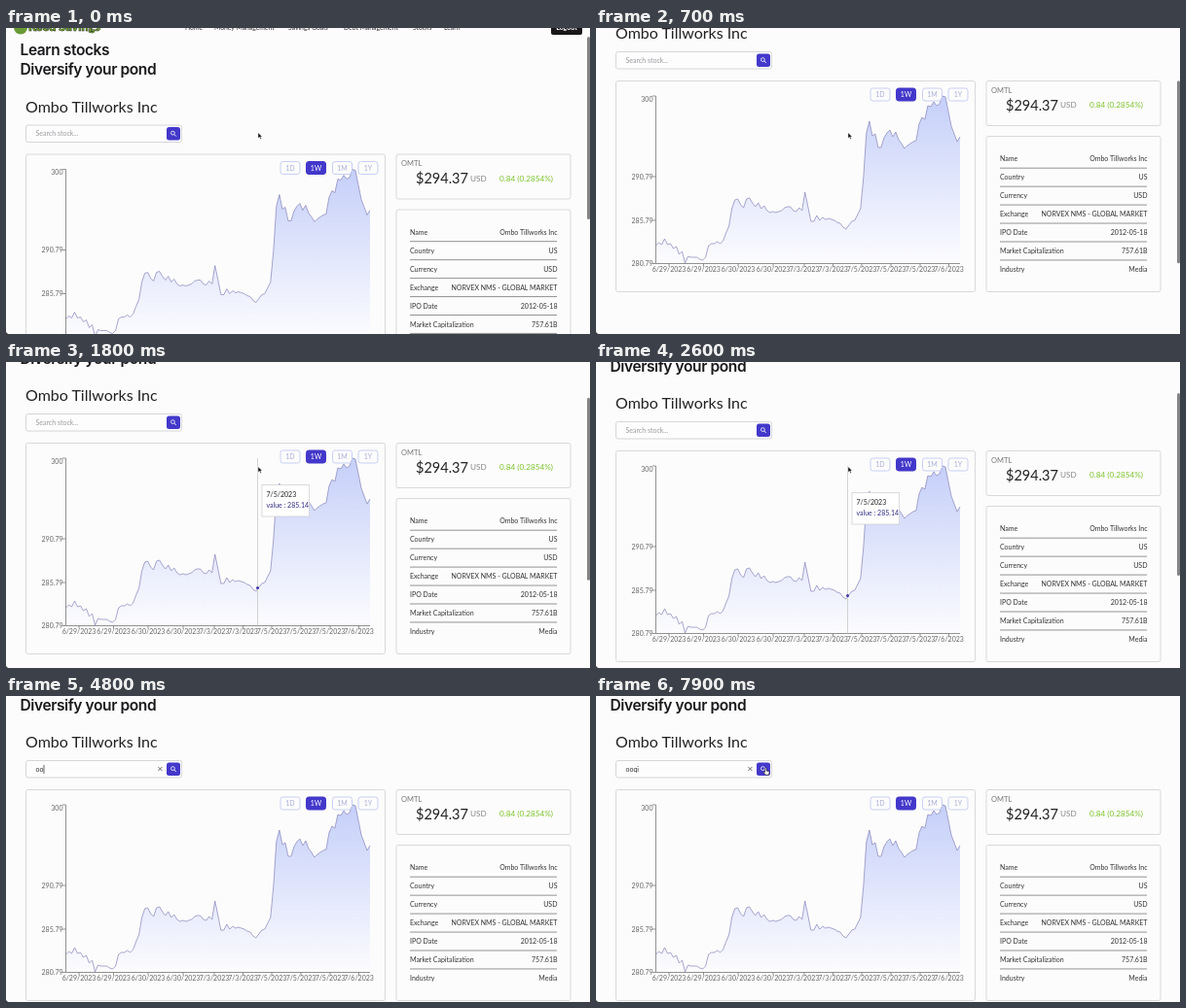
Animation, 600 px wide and 315 px high, one loop 8 s. Source, as an HTML page:

```html
<!DOCTYPE html>
<html lang="en">
<head>
<title>Stock page</title>
<style>
html, body { margin: 0; width: 100%; height: 100%; overflow: hidden; background: #fcfcfc; }
svg { display: block; width: 100%; height: 100%; }
text { font-family: Lato, "Open Sans", sans-serif; white-space: pre; }
.heading { font: 600 15.5px Inter, "Liberation Sans", sans-serif; letter-spacing: -.025em; }
</style>
</head>
<body>
<svg id="stage" viewBox="0 0 600 315">
  <defs>
    <linearGradient id="area" gradientUnits="userSpaceOnUse" x1="0" y1="112" x2="0" y2="284.5">
      <stop offset="0" stop-color="#c5cff9"/>
      <stop offset="1" stop-color="#fcfcfe"/>
    </linearGradient>
  </defs>
  <g id="page">
    <g id="content"></g>
    <g id="tooltip">
      <path d="M258.5 112V284.5" stroke="#c8c8c8" stroke-width=".8"/>
      <circle cx="258.5" cy="245.6" r="1.5" fill="#3f36a8"/>
      <rect x="263" y="139.5" width="48.5" height="32.5" fill="#fff" stroke="#ccc" stroke-width=".7"/>
      <text x="267.5" y="151.8" font-size="7" fill="#222">7/5/2023</text>
      <text x="267.5" y="163.3" font-size="7" fill="#322e81">value : 285.14</text>
    </g>
    <text id="query" x="30.5" y="77.6" font-size="7"></text>
    <path id="caret" d="M0 71V80" stroke="#222" stroke-width=".7"/>
    <path id="clear" d="M156.4 73l4 4m0-4l-4 4" stroke="#444" stroke-width=".8"/>
  </g>
  <rect id="thumb" x="597" width="3" height="188" rx="1.5" fill="#858585"/>
  <path d="M0 312.7Q.4 314.7 2.6 315H0Z" fill="#222"/>
  <g id="pointer" stroke-linejoin="round">
    <path id="arrow" d="M0 0V5.8L1.4 4.6 2.4 6.7 3.4 6.3 2.5 4.2H4.2Z" fill="#000" stroke="#fff" stroke-width=".5"/>
    <path id="beam" d="M-1.5-4.5Q0-4.5 0-3.5Q0-4.5 1.5-4.5M0-3.5V3.5M-1.5 4.5Q0 4.5 0 3.5Q0 4.5 1.5 4.5" fill="none" stroke="#222" stroke-width=".7"/>
    <path id="hand" d="M-.8-2.4Q0-3.4.7-2.4V0L3 .6Q3.7.9 3.5 2L3 4.2H-.4L-2.4 1.4Q-2.4.4-.8 1.4Z" fill="#fff" stroke="#111" stroke-width=".6"/>
  </g>
</svg>
<script>
const LOOP = 8000, STEP = 100, INDIGO = '#4338ca';
const $ = id => document.getElementById(id);

const text = (x, y, str, { size = 7, fill = '#333', anchor = 'start', extra = '' } = {}) =>
  `<text x="${x}" y="${y}" font-size="${size}" fill="${fill}" text-anchor="${anchor}" ${extra}>${str}</text>`;
const box = (x, y, w, h, r, fill, stroke = 'none') =>
  `<rect x="${x}" y="${y}" width="${w}" height="${h}" rx="${r}" fill="${fill}" stroke="${stroke}"/>`;
const line = (d, stroke, width = .8) =>
  `<path d="${d}" fill="none" stroke="${stroke}" stroke-width="${width}" stroke-linejoin="round"/>`;
const card = (x, y, w, h) => box(x, y, w, h, 2, '#fcfcfc', '#d9d9dc');

function navBar() {
  const items = [[184, 'Home'], [214, 'Money Management', 275], [290, 'Savings Goals', 333],
    [347, 'Debt Management', 404], [418, 'Stocks'], [450, 'Learn', 470]];
  return '<circle cx="15" cy="-34" r="7" fill="#6a9a35"/>' +
    text(23, -30.6, 'Reed Savings', { size: 12.5, fill: '#79b530', extra: 'font-weight="900" stroke="#111" stroke-width=".5"' }) +
    items.map(([x, label, chevron]) => text(x, -32, label, { size: 6.8 }) +
      (chevron ? line(`M${chevron - 1.5}-35l1.5 1.5 1.5-1.5`, '#555', .6) : '')).join('') +
    box(560, -43, 32, 16.5, 2, '#18181b') +
    text(576, -32, 'Logout', { fill: '#fff', anchor: 'middle', extra: 'font-weight="700"' });
}

function searchBox() {
  return box(20.5, 66.5, 160, 17.5, 2, '#fdfdfd', '#d6d6da') +
    box(165, 68.5, 14, 13.5, 2.5, INDIGO) +
    '<circle cx="171.4" cy="74.6" r="1.9" fill="none" stroke="#fff" stroke-width=".8"/>' +
    line('M172.8 76l2 2', '#fff', .9);
}

function chart() {
  const heights = [
    266, 263, 265, 259, 265, 264, 269, 267, 275, 272, 284, 277, 278, 278, 278, 280, 281, 278, 266, 264, 264,
    262, 264, 261, 253, 246, 228, 219, 218, 224, 227, 218, 217, 222, 226, 222, 228, 225, 230, 232, 231, 232,
    231, 230, 227, 226, 226, 230, 231, 227, 230, 211, 226, 241, 241, 235, 240, 237, 239, 238, 239, 240, 242,
    243, 247, 249, 245, 241, 240, 234, 228, 196, 150, 138, 153, 151, 165, 165, 155, 150, 147, 154, 149, 157,
    161, 166, 163, 161, 159, 158, 141, 134, 136, 122, 123, 118, 122, 120, 112, 113, 128, 143, 151, 159, 154];
  const left = 61.5, right = 374, bottom = 284.5;
  const curve = 'M' + heights.map((y, i) =>
    `${(left + (right - left) * i / (heights.length - 1)).toFixed(1)} ${y}`).join('L');
  const days = [[75, '6/29'], [110.5, '6/29'], [146, '6/30'], [182, '6/30'], [214, '7/3'],
    [243.5, '7/3'], [273, '7/5'], [303, '7/5'], [333, '7/5'], [362.5, '7/6']];
  const levels = [[112, 117.8, '300'], [195, 197.5, '290.79'], [240, 242.5, '285.79'], [284.5, 287.3, '280.79']];
  const ranges = [[282, '1D'], [308.5, '1W'], [335.5, '1M'], [362, '1Y']];
  return card(20.5, 96.5, 369, 217) +
    `<path d="${curve}V${bottom}H${left}Z" fill="url(#area)"/>` + line(curve, '#8b89bd', .75) +
    line(`M${left} 112V${bottom}H${right}`, '#777') +
    days.map(([x, day]) => line(`M${x} ${bottom}v3`, '#777') +
      text(x, 293.2, day + '/2023', { fill: '#666', anchor: 'middle' })).join('') +
    levels.map(([y, baseline, label]) => line(`M${left - 3.5} ${y}h3.5`, '#777') +
      text(58.5, baseline, label, { fill: '#666', anchor: 'end' })).join('') +
    ranges.map(([x, label]) => {
      const on = label === '1W';
      return box(x, 104, 20, 13, 2.5, on ? INDIGO : 'none', on ? INDIGO : '#c7d0f5') +
        text(x + 10, 113, label, { fill: on ? '#fff' : '#a9afd6', anchor: 'middle' });
    }).join('');
}

function details() {
  const rows = [['Name', 'Ombo Tillworks Inc'], ['Country', 'US'], ['Currency', 'USD'],
    ['Exchange', 'NORVEX NMS - GLOBAL MARKET'], ['IPO Date', '2012-05-18'],
    ['Market Capitalization', '757.61B'], ['Industry', 'Media']];
  return card(401, 96.5, 179, 46) +
    text(406, 108.6, 'OMTL', { size: 7.5, fill: '#777' }) +
    text(421, 126.8, '$294.37', { size: 14.5, fill: '#222' }) +
    text(477, 124.3, 'USD', { size: 8.2, fill: '#888' }) +
    text(507, 124.3, '0.84 (0.2854%)', { size: 8.2, fill: '#7cc32a' }) +
    card(401, 153.5, 179, 160) +
    rows.map(([label, value], i) => {
      const y = 179.3 + 18.95 * i;
      return text(415, y, label) + text(566.5, y, value, { anchor: 'end' }) +
        (i < 6 ? line(`M415 ${y + 6.9}H566`, '#666', .7) : '');
    }).join('');
}

$('content').innerHTML = navBar() +
  '<text class="heading" x="14.5" y="-6" fill="#18181b">Learn stocks</text>' +
  '<text class="heading" x="14.5" y="14.7" fill="#18181b">Diversify your pond</text>' +
  text(20, 53.2, 'Ombo Tillworks Inc', { size: 16, fill: '#222' }) +
  searchBox() + chart() + details();

const clamp = p => Math.min(1, Math.max(0, p));
const linear = p => p;
const easeOut = p => 1 - (1 - p) ** 2;
const smooth = p => p * p * (3 - 2 * p);

// Each entry: end time, value reached then, easing used to get there.
const scrollKeys = [[0, 33.5, linear], [50, 33.5, linear], [400, -10.5, linear], [900, -48, easeOut],
  [1150, -55, easeOut], [1300, -55, linear], [1800, -13, smooth], [2000, -12, easeOut],
  [2100, -12, linear], [3000, 0, smooth], [LOOP, 0, linear]];
const pointerKeys = {
  x: [[0, 259, linear], [3000, 259, linear], [3800, 66, smooth], [6000, 66, linear],
    [6800, 174.5, smooth], [LOOP, 174.5, linear]],
  y: [[0, 107.7, linear], [3000, 107.7, linear], [3800, 75, smooth], [6000, 75, linear],
    [6800, 77, smooth], [LOOP, 77, linear]]
};

function sample(keys, t) {
  const i = Math.max(1, keys.findIndex(([end]) => t <= end));
  const [t0, from] = keys[i - 1], [t1, to, ease] = keys[i];
  return from + (to - from) * ease(clamp((t - t0) / (t1 - t0)));
}

const word = 'ooqi', keyTimes = [4600, 4800, 5500, 5600];
const show = (id, on) => $(id).setAttribute('visibility', on ? 'visible' : 'hidden');
const within = (t, a, b) => t >= a && t < b;

function render(t) {
  const offset = sample(scrollKeys, t);
  $('page').setAttribute('transform', `translate(0 ${offset.toFixed(2)})`);
  $('thumb').setAttribute('y', 29 - .6 * offset);
  $('thumb').setAttribute('opacity', 1 - clamp((t - 3400) / 400));
  show('tooltip', within(t, 1100, 3200));

  const typed = word.slice(0, keyTimes.filter(k => t >= k).length);
  const query = $('query');
  query.textContent = typed || 'Search stock...';
  query.setAttribute('fill', typed ? '#333' : '#9a9aa2');
  const end = 30.5 + (typed ? query.getComputedTextLength() + .5 : 0);
  $('caret').setAttribute('transform', `translate(${end} 0)`);
  show('caret', within(t, 4100, 5300) || within(t, 5500, 6100));
  show('clear', typed);

  const x = sample(pointerKeys.x, t), y = sample(pointerKeys.y, t);
  const visible = !within(t, 4600, 6100);
  const inField = x < 181 && within(y, 66, 84);
  $('pointer').setAttribute('transform', `translate(${x.toFixed(2)} ${y.toFixed(2)})`);
  show('arrow', visible && !inField);
  show('beam', visible && inField && x < 165);
  show('hand', visible && inField && x >= 165);
}

const start = performance.now();
function tick() {
  const t = (performance.now() - start) % LOOP;
  render(Math.floor(t / STEP) * STEP);
  requestAnimationFrame(tick);
}
tick();
</script>
</body>
</html>
```
